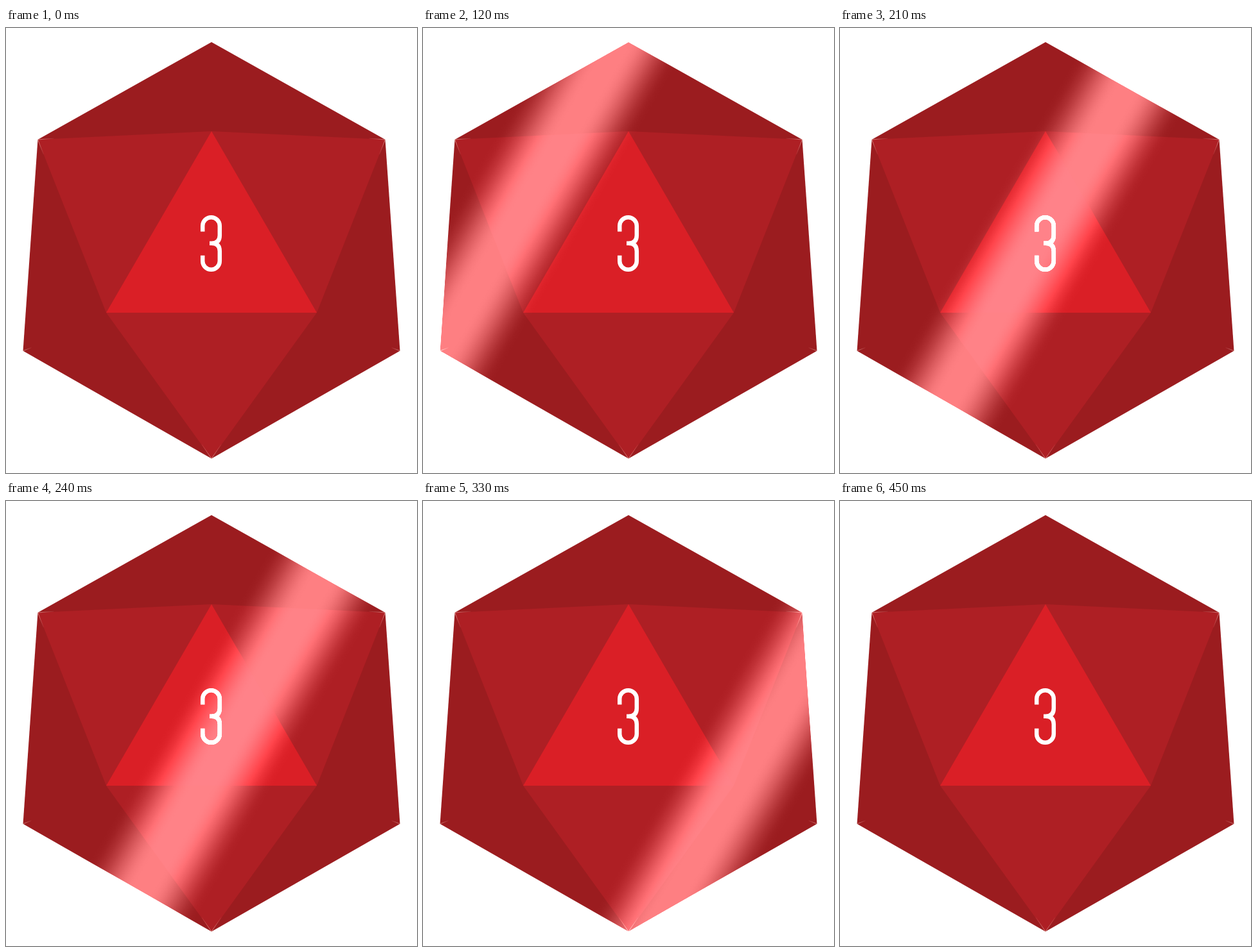
An HTML page with a canvas that plays this animation: 640 by 694 pixels, repeating every 4.5 s.

```html
<!DOCTYPE html>
<html lang="en">
<head>
<meta charset="utf-8">
<title>Twenty-sided die</title>
<style>
html, body { margin: 0; width: 100%; height: 100%; overflow: hidden; background: #fff; }
canvas { display: block; width: 640px; height: 694px; }
</style>
</head>
<body>
<canvas id="stage" width="640" height="694"></canvas>
<script>
(() => {
  const ctx = document.getElementById('stage').getContext('2d');
  const LOOP = 4500, STEP = 30, LAST = 14;

  // Outer corners, clockwise, then the front triangle
  const apex = [320, 22], upRight = [590.5, 174], lowRight = [613.5, 503.5];
  const base = [320, 671.5], lowLeft = [26.5, 503.5], upLeft = [49.5, 174];
  const tip = [320, 161], triRight = [484, 444], triLeft = [156, 444];

  const digit = new Path2D(
    'M306.2 317.5V308.5A13.3 13.3 0 0 1 332.8 308.5V323.5' +
    'Q332.8 335.8 320 335.8H317H320Q332.8 335.8 332.8 348V363.5' +
    'A13.3 13.3 0 0 1 306.2 363.5V354.8');

  function face(color, ...points) {
    ctx.beginPath();
    points.forEach(p => ctx.lineTo(...p));
    ctx.closePath();
    ctx.fillStyle = color;
    ctx.fill();
  }

  // Fine light seams where faces meet at the outer corners
  function seam([x, y], dx, dy) {
    const g = ctx.createLinearGradient(x, y, x + dx, y + dy);
    g.addColorStop(0, 'rgba(255,215,205,.7)');
    g.addColorStop(1, 'rgba(255,190,180,.1)');
    ctx.strokeStyle = g;
    ctx.lineWidth = 0.8;
    ctx.beginPath();
    ctx.moveTo(x, y);
    ctx.lineTo(x + dx, y + dy);
    ctx.stroke();
  }

  function drawDie() {
    ctx.fillStyle = '#fff';
    ctx.fillRect(0, 0, 640, 694);
    face('#9b1c1f', apex, upRight, lowRight, base, lowLeft, upLeft);
    face('#ae1f24', upLeft, tip, upRight, triRight, base, triLeft);
    face('#da1f26', tip, triRight, triLeft);
    for (const s of [1, -1]) {
      seam(s > 0 ? upLeft : upRight, 25 * s, -1.8);
      seam(s > 0 ? upLeft : upRight, 9 * s, 23);
      seam(s > 0 ? lowLeft : lowRight, 13 * s, -5);
      seam(base, 15 * s, -22);
    }
    ctx.strokeStyle = '#fff';
    ctx.lineWidth = 6.5;
    ctx.stroke(digit);
  }

  // Additive light band, tilted 30 degrees, centred on x at mid height
  function drawShine(x) {
    const half = 110, flat = 15, stops = 40;
    const nx = Math.cos(Math.PI / 6), ny = 0.5, r = half * nx;
    const g = ctx.createLinearGradient(x - nx * r, 350 - ny * r, x + nx * r, 350 + ny * r);
    for (let i = 0; i <= stops; i++) {
      const d = Math.abs(i / stops * 2 - 1) * half;
      const u = Math.max(0, (d - flat) / (half - flat));
      const a = 0.39 * (1 + Math.cos(Math.PI * u)) / 2;
      g.addColorStop(i / stops, `rgba(255,255,255,${a.toFixed(4)})`);
    }
    ctx.globalCompositeOperation = 'lighter';
    ctx.fillStyle = g;
    ctx.fillRect(0, 0, 640, 694);
    ctx.globalCompositeOperation = 'source-over';
  }

  const start = performance.now();
  function tick() {
    const t = (performance.now() - start) % LOOP;
    const k = Math.floor(t / STEP);
    drawDie();
    if (k >= 1 && k <= LAST) drawShine(300 + (k - 7) * 61);
    requestAnimationFrame(tick);
  }
  tick();
})();
</script>
</body>
</html>
```
